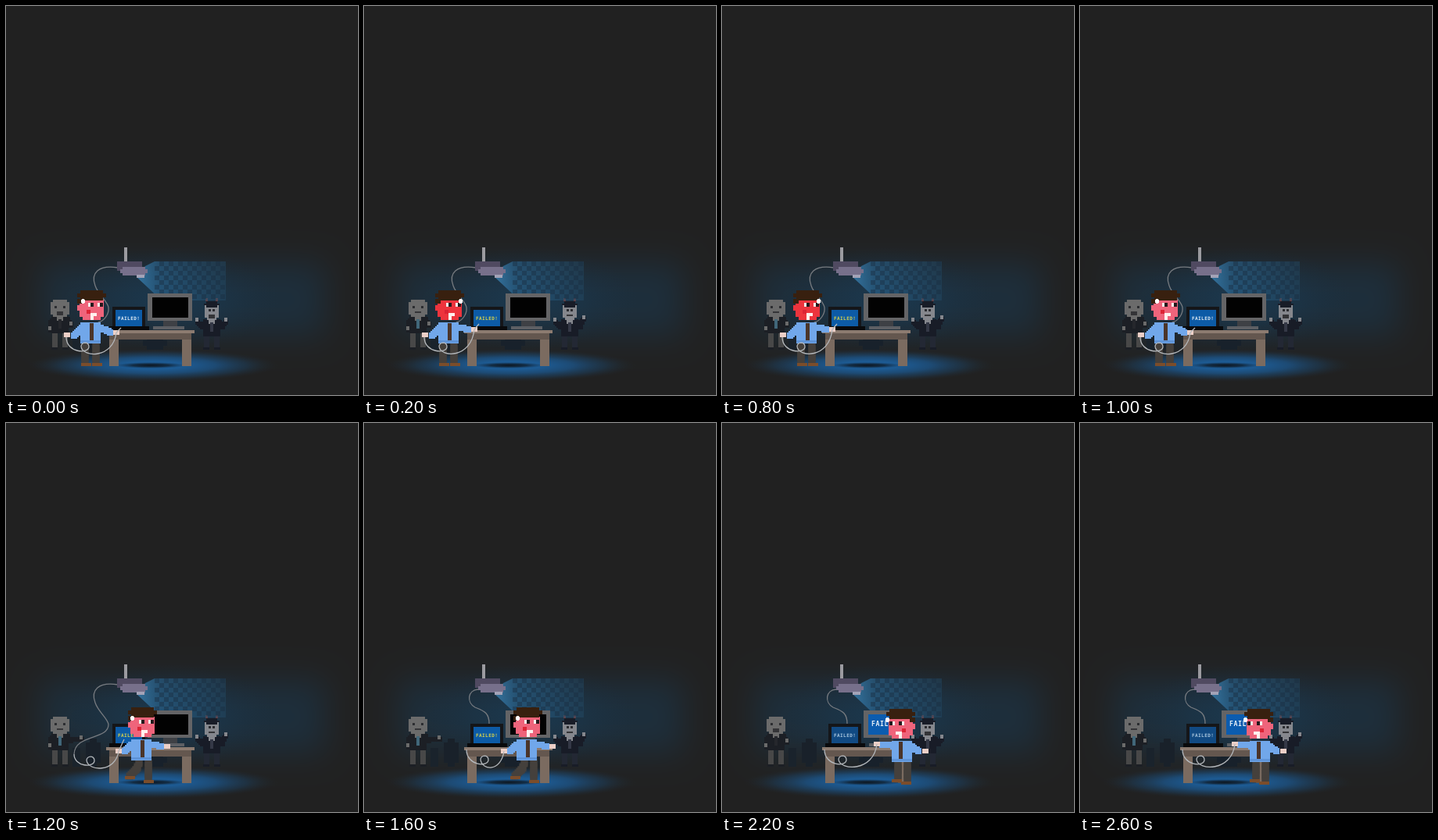
These frames come from a looping animation (450 by 498 pixels, 2.8 s). An HTML page with a canvas:

```html
<!DOCTYPE html>
<html lang="en">
<head>
<meta charset="utf-8">
<title>Presentation failure</title>
<style>
html, body { margin: 0; width: 100%; height: 100%; overflow: hidden; background: #212121; }
canvas { display: block; }
</style>
</head>
<body>
<canvas id="stage" width="450" height="498"></canvas>
<script>
const c = document.getElementById('stage').getContext('2d');
const BEAT = 200, BEATS = 14, FLOOR = 440;
const SHIRT = '#71a7ea', TROUSERS = '#45403c', HAND = '#edd0c8', CABLE = '#b4b8bc';

function block(color, x, y, w, h) {
  c.fillStyle = color;
  c.fillRect(x, y, w, h);
}

// A block with its corners cut out.
function blob(color, x, y, w, h, cut = 4) {
  block(color, x + cut, y, w - 2 * cut, h);
  block(color, x, y + cut, w, h - 2 * cut);
}

function at(x, y, flip, draw) {
  c.save();
  c.translate(x, y);
  if (flip) c.scale(-1, 1);
  draw();
  c.restore();
}

// Draws a part and its mirror image about x = axis.
function both(axis, draw) {
  draw();
  at(2 * axis, 0, true, draw);
}

// A stepped chain of squares through the joints.
function limb(color, size, ...joints) {
  const snap = v => Math.round(v / 2) * 2 - size / 2;
  joints.slice(1).forEach(([x1, y1], i) => {
    const [x0, y0] = joints[i];
    const n = Math.max(1, Math.ceil(Math.hypot(x1 - x0, y1 - y0) / 3));
    for (let k = 0; k <= n; k++) {
      block(color, snap(x0 + (x1 - x0) * k / n), snap(y0 + (y1 - y0) * k / n), size, size);
    }
  });
}

function glow(x, y, rx, ry, ...stops) {
  at(x, y, false, () => {
    c.scale(rx, ry);
    const g = c.createRadialGradient(0, 0, 0, 0, 0, 1);
    stops.forEach((s, i) => g.addColorStop(i / (stops.length - 1), s));
    c.fillStyle = g;
    c.fillRect(-1, -1, 2, 2);
  });
}

// Only the shadow of an off-stage block lands on the stage.
function softBlock(color, x, y, w, h, blur) {
  c.save();
  c.shadowColor = color;
  c.shadowBlur = blur;
  c.shadowOffsetX = 1000;
  block('#000', x - 1000, y, w, h);
  c.restore();
}

function cord(color, path) {
  c.strokeStyle = color;
  c.lineWidth = 1.3;
  c.stroke(new Path2D(path));
}

// A slack cable with one small loop on its way to the hand.
function slack([x0, y0], [lx, ly], [x1, y1]) {
  cord(CABLE, `M${x0} ${y0}C${x0} ${ly + 8} ${lx + 5} ${ly + 10} ${lx + 5} ${ly}`
    + `C${lx + 5} ${ly - 7} ${lx - 5} ${ly - 6} ${lx - 5} ${ly}`
    + `C${lx - 3} ${ly + 14} ${x1 - 4} ${ly + 16} ${x1} ${y1}`);
}

function label(text, x, y, size, color) {
  c.fillStyle = color;
  c.font = `bold ${size}px "DejaVu Sans Mono", monospace`;
  c.letterSpacing = size * .07 + 'px';
  c.fillText(text, x, y);
}

function room() {
  block('#212121', 0, 0, 450, 498);
  softBlock('#1d2e3b', 45, 330, 362, 92, 40);
  glow(210, 375, 140, 66, 'rgba(26,64,93,.6)', 'rgba(26,60,86,.35)', 'rgba(26,50,70,0)');
  glow(188, 460, 160, 21, '#1e609c', '#1d5a92', '#1d4a73', 'rgba(30,56,79,.7)', 'rgba(33,40,46,0)');
  glow(185, 460, 46, 4, 'rgba(12,18,25,.95)', 'rgba(14,24,34,.7)', 'rgba(20,50,80,0)');
}

function projection(beat) {
  const g = c.createLinearGradient(168, 0, 281, 0);
  g.addColorStop(0, 'rgba(62,142,196,.7)');
  g.addColorStop(.25, 'rgba(43,105,150,.55)');
  g.addColorStop(1, 'rgba(36,78,108,.4)');
  c.fillStyle = g;
  c.fill(new Path2D('M178 333L190 327H281V377H199L167 347Z'));
  for (let i = 0; i < 120; i++) {
    const col = i % 15, row = Math.floor(i / 15);
    if ((col + row + beat) % 2) block('rgba(25,45,62,.42)', 190 + col * 6, 327 + row * 6, 6, 6);
  }
}

function projector() {
  block('#9b9ba0', 151, 309, 4, 18);
  block('#504a61', 142, 327, 32, 12);
  blob('#77708b', 146, 334, 35, 11, 3);
  block('#a3a3b7', 167, 344, 10, 4);
}

// Drawn about the middle of the figure, from the top of the head.
function guest(x, y, { wide, skin, suit, legs, hands, open, tie, hair }) {
  const half = wide / 2;
  at(x, y, false, () => {
    both(0, () => {
      block(legs, -10, 40, 7, FLOOR - y - 40);
      block(suit, -11, FLOOR - y - 3, 8, 3);
    });
    block(suit, -11, 22, 22, 22);
    hands.forEach(([hx, hy]) => {
      const side = Math.sign(hx);
      limb(suit, 6, [side * 9, 26], [side * 13, 31], [hx, hy]);
      block(skin, hx - 2, hy - 5, 4, 5);
    });
    block(skin, -4, 21, 8, 7);
    block(tie, -2, 26, 4, 12);
    blob(skin, -half, 1, wide, 22, 3);
    if (hair) {
      blob(suit, -half - 1, -1, wide + 2, 8, 3);
      both(0, () => block('#643e42', -half + 1, -5, 3, 4));
    }
    both(0, () => block('#2c2d31', -half + 5, 9, 3, 3));
    block('#343437', -4, 16, 8, open ? 5 : 2);
  });
}

function audience(scene, beat) {
  const reach = scene === 'plug' || scene === 'walk';
  guest(69, 375, {
    wide: 24, skin: '#6b6b6b', suit: '#1c1f25', legs: '#484848',
    hands: [[-13, 40], reach ? [27, 30] : [14, 34]],
    open: !beat, tie: beat ? '#41677a' : '#25272c'
  });
  guest(263, 379, {
    wide: 18, skin: '#85878d', suit: '#181c27', legs: '#232834',
    hands: [[-19, 25], [18, beat ? 22 : 25]],
    open: !beat, tie: '#343846', hair: true
  });
}

function chairs() {
  blob('#19212a', 102, 404, 19, 36, 5);
  block('#1a232c', 85, 416, 10, 24);
  blob('#18212b', 175, 423, 31, 17, 5);
}

function desk(on, beat) {
  both(184.5, () => block('#7b6b60', 132, 419, 12, 42));
  block('#64574f', 132, 419, 105, 8);
  block('#8c7b70', 128, 415, 113, 4);

  block('#3e4045', 201, 403, 18, 7);
  block('#5d5f64', 188, 410, 40, 4);
  block('#646466', 181, 368, 57, 35);
  block(on ? '#0b5caf' : '#020202', 187, 373, 46, 26);
  if (on) label('FAILED!', 191, 388, 8.2, beat ? '#e4df51' : '#e3edf6');

  block('#151619', 136, 385, 42, 26);
  block(on ? '#114a83' : '#0d5ba6', 140, 389, 34, 21);
  label('FAILED!', 143, 402, 6, beat ? '#d9d34a' : on ? '#a8c6df' : '#e3edf6');
  block('#090a0c', 132, 410, 51, 5);
}

// Drawn from the top left of the hair, looking right.
function head(red, sweat) {
  const skin = red ? '#ed343d' : '#ef647b';
  blob(skin, 3, 8, 31, 30);
  block(skin, 0, 19, 5, 7);
  blob('#38200f', 0, 0, 37, 13);
  block('#38200f', 0, 11, 7, 6);
  [14, 26].forEach(x => {
    block('#f7f2ef', x, 16, 5, 5);
    block('#24191c', x + 3, 16, 4, 5);
  });
  block('#dc2435', 12, 25, 5, 5);
  block('#fff0ee', 17, 29, 8, 4);
  block('#fff0ee', 17, 33, 4, 5);
  blob('#fff', sweat, 11, 5, 6, 1);
}

function presenter({ hands, legs, red, sweat }) {
  legs.forEach(joints => {
    const [x, y] = joints.at(-1);
    limb(TROUSERS, 9, ...joints);
    block('#7b4d2b', x - 5, y + 1, 13, 4);
  });
  block(SHIRT, 4, 41, 26, 27);
  block('#5f94d8', 4, 64, 26, 3);
  block('#4b352a', 16, 42, 5, 22);
  hands.forEach(([x, y], i) => {
    limb(SHIRT, 8, [i ? 28 : 6, 47], [x + (i ? -8 : 8), y]);
    block(HAND, x - 4, y - 3, 8, 6);
  });
  head(red, sweat);
}

const straight = x => [[x, 70], [x, 92]];

// Where the presenter stands, how he poses and how the cable hangs.
function pose(scene, beat) {
  if (scene === 'hold') return {
    x: 91, y: 364, hands: [[-13, 57], [50, beat ? 50 : 54]],
    legs: [straight(10), straight(24)], red: beat, sweat: beat ? 30 : 5,
    cable: [[77, 424], [101, 436]], tip: [147, beat ? 407 : 412]
  };
  if (scene === 'done') return {
    x: 247, y: 366, flip: true, hands: [[-13, 54], [49, 45 + beat * 3]],
    legs: [straight(10), [[22, 70], [22, 89]]], red: beat, sweat: beat ? 5 : 33,
    cable: [[131, 418], [154, 431 + beat * 4]]
  };
  const walk = scene === 'walk';
  return {
    x: walk ? 191 : 156, y: 364, hands: [[-12, 56], [50, 50]],
    legs: [[[14, 70], [10, 80], [1, 87]], straight(25)], sweat: 3,
    cable: walk ? [[131, 418], [154, 431]] : [[87, 424], [108, 432]],
    tip: walk ? null : [151, 405], near: true
  };
}

function draw(scene, beat, crowd) {
  const linked = scene === 'walk' || scene === 'done';
  const p = pose(scene, beat);
  const [hx, hy] = p.hands[p.near ? 0 : 1];
  const grip = [p.x + (p.flip ? -hx : hx), p.y + hy];
  const tail = scene === 'hold' ? 'C132 394 126 403 118 405' : 'C131 406 88 398 87 424';

  room();
  chairs();
  audience(scene, crowd);
  projection(crowd);
  cord('#777b80', linked
    ? 'M146 341C132 342 131 358 142 364C155 369 160 372 160 385'
    : 'M143 335C118 331 108 342 114 358C118 370 130 378 131 386' + tail);
  projector();
  desk(scene === 'done', beat);
  at(p.x, p.y, p.flip, () => presenter(p));
  slack(...p.cable, grip);
  if (p.tip) cord(CABLE, `M${grip}L${p.tip}`);
}

function tick(now) {
  const step = Math.floor(now / BEAT) % BEATS;
  // The third beat is held twice as long; the crowd lags at the end.
  const beat = (step < 3 ? step : step - 1) % 2;
  const crowd = step < 12 ? beat : 1 - beat;
  const scene = step < 6 ? 'hold' : step < 8 ? 'plug' : step < 9 ? 'walk' : 'done';
  draw(scene, beat, crowd);
  requestAnimationFrame(tick);
}
tick(0);
</script>
</body>
</html>
```
